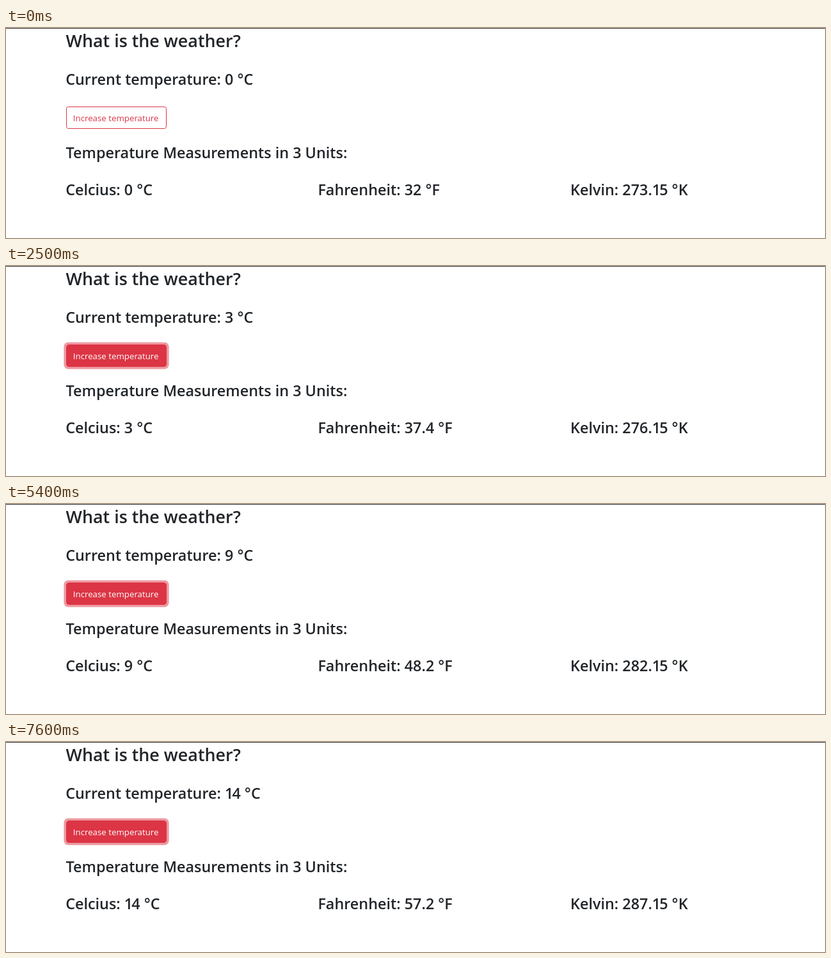
An HTML page that plays this animation: 1280 by 329 pixels, repeating every 8 s.

```html
<!DOCTYPE html>
<html lang="en">
<head>
<meta charset="utf-8">
<title>Weather</title>
<style>
  html, body { margin: 0; width: 100%; height: 100%; overflow: hidden; background: #fff; }
  svg { display: block; width: 1280px; height: 329px; }
  text { font: 600 23.4px "Open Sans", "Noto Sans", sans-serif; fill: #212529; white-space: pre; }
  .title { font-size: 26.9px; }
  #label { font-size: 13.3px; font-weight: 400; }
</style>
</head>
<body>
<svg viewBox="0 0 1280 329">
  <rect width="1280" height="1" fill="#333"/>
  <text class="title" x="93.5" y="29.5">What is the weather?</text>
  <text id="current" x="93.2" y="89"></text>

  <rect id="ring" fill="#dc3545"/>
  <rect x="94" y="123" width="157" height="35" rx="3.4" fill="#fff"/>
  <rect id="button" x="94.5" y="123.5" width="156" height="34" rx="3" fill="#dc3545" stroke="#dc3545"/>
  <text id="label" x="104.8" y="145.7">Increase temperature</text>

  <text x="93.5" y="203.5">Temperature Measurements in 3 Units:</text>
  <text id="celsius" x="93.2" y="262"></text>
  <text id="fahrenheit" x="487.4" y="262"></text>
  <text id="fahrenheit2" x="487.4" y="292"></text>
  <text id="kelvin" x="882" y="262"></text>
</svg>
<script>
const LOOP = 8000;
const CLICKS = [1700, 2100, 2500, 3700, 4200, 4500, 4800, 5100, 5400, 5900, 6100, 6300, 6700, 6900];

// [start time, value], held until the next step
const HOVER = [[0, 0], [1000, .5], [1100, 1], [7100, .85], [7200, .1], [7300, 0], [7500, .5], [7600, 1]];
const FOCUS = [[0, 0], [1700, .48], [1800, 1]];

const $ = id => document.getElementById(id);
const stepAt = (steps, t) => steps.filter(s => s[0] <= t).pop()[1];
const mix = (a, b, p) => Math.round(a + (b - a) * p);

function setAttrs(el, attrs) {
  for (const key in attrs) el.setAttribute(key, attrs[key]);
}

// The digit 1 is set a little tighter than the others
function setText(id, text) {
  $(id).innerHTML = text.replace(/1/g, '<tspan letter-spacing="-2">1</tspan>');
}

function showReadings(c) {
  const value = c * 1.8 + 32;
  const wraps = String(value).length > 6;
  setText('current', `Current temperature: ${c} °C`);
  setText('celsius', `Celcius: ${c} °C`);
  setText('fahrenheit', wraps ? 'Fahrenheit:' : `Fahrenheit: ${value} °F`);
  setText('fahrenheit2', wraps ? `${value} °F` : '');
  setText('kelvin', `Kelvin: ${(c + 273.15).toFixed(2)} °K`);
}

function showButton(hover, focus) {
  const spread = 3.6 * focus;
  setAttrs($('ring'), {
    x: 94 - spread, y: 123 - spread,
    width: 157 + 2 * spread, height: 35 + 2 * spread,
    rx: 3.4 + spread, 'fill-opacity': .5 * focus
  });
  $('button').setAttribute('fill-opacity', hover);
  $('label').style.fill = `rgb(${mix(220, 255, hover)},${mix(53, 255, hover)},${mix(69, 255, hover)})`;
}

let shown = -1;

function frame() {
  const t = performance.now() % LOOP;
  const count = CLICKS.filter(c => c <= t).length;
  if (count !== shown) showReadings(shown = count);
  showButton(stepAt(HOVER, t), stepAt(FOCUS, t));
  requestAnimationFrame(frame);
}
frame();
</script>
</body>
</html>
```
